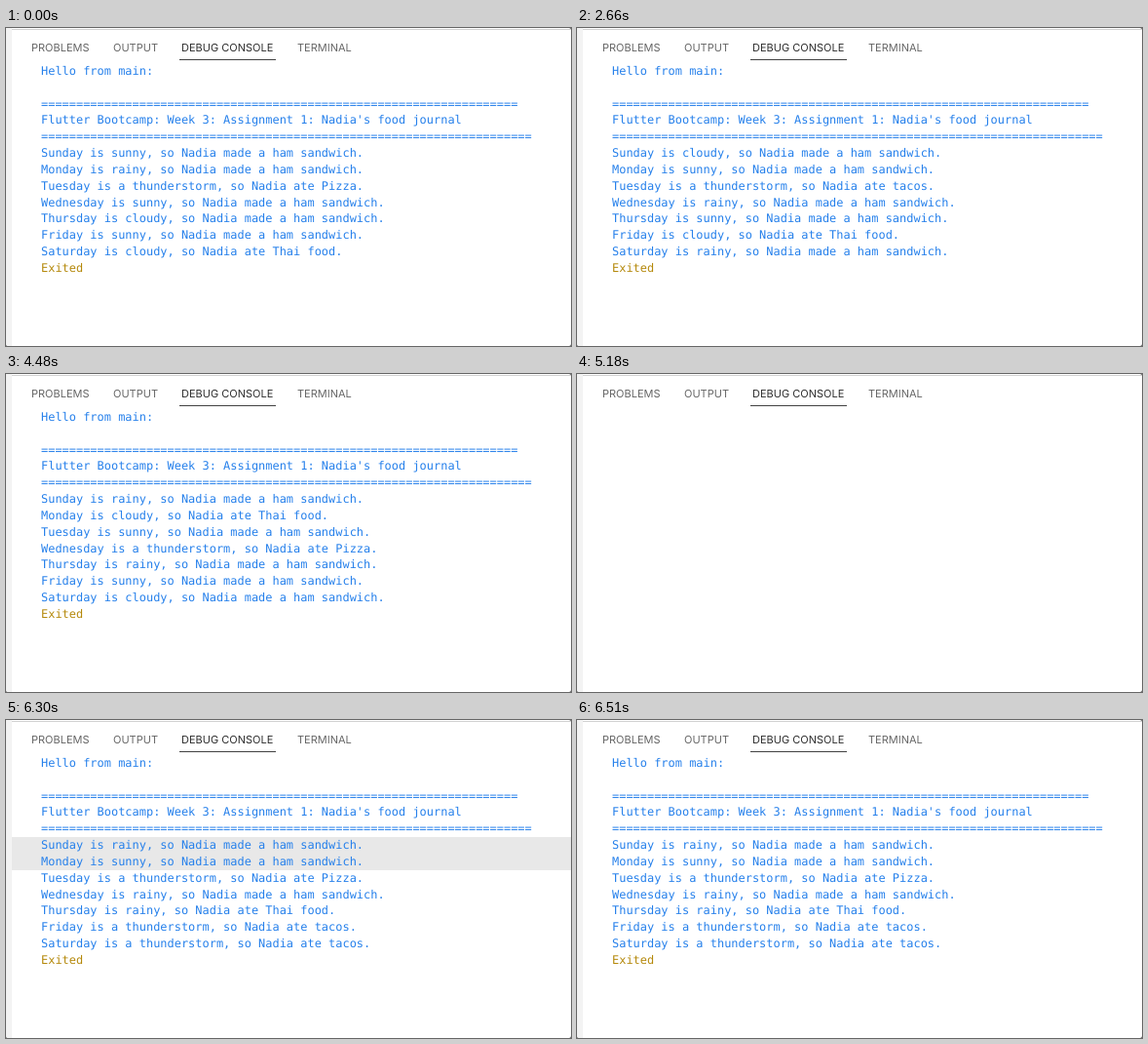
These frames come from a looping animation (580 by 326 pixels, 7.07 s). An HTML page:

```html
<!DOCTYPE html>
<html lang="en">
<head>
<meta charset="utf-8">
<title>Debug console</title>
<style>
  html, body { margin: 0; width: 100%; height: 100%; overflow: hidden; background: #444; }
  #stage {
    position: relative; width: 580px; height: 326px; overflow: hidden;
    background: #fff; border-radius: 0 2px 2px 2px;
    text-rendering: geometricPrecision;
  }
  #side { position: absolute; left: 0; top: 0; width: 6px; height: 326px; background: #f3f3f3; }
  #top { position: absolute; left: 6px; right: 0; top: 1px; height: 1px; background: #d2d2d2; }
  .tab {
    position: absolute; top: 13px; white-space: nowrap;
    font: 11px/14px Inter, "Open Sans", sans-serif; color: #666;
  }
  .active { color: #2f2f2f; }
  #line { position: absolute; left: 178px; top: 32px; width: 99px; height: 1px; background: #424242; }
  #log {
    position: absolute; left: 6px; right: 0; top: 36px;
    font: 11.96px/16.83px "DejaVu Sans Mono", monospace; color: #2680eb;
  }
  #log div { height: 16.83px; padding-left: 30px; white-space: pre; }
  #log div:last-child { color: #b5890c; }
  #log .hover { background: #e8e8e8; }
</style>
</head>
<body>
<div id="stage">
  <div id="side"></div>
  <div id="top"></div>
  <span class="tab" style="left:26px">PROBLEMS</span>
  <span class="tab" style="left:110px">OUTPUT</span>
  <span class="tab active" style="left:180px">DEBUG CONSOLE</span>
  <span class="tab" style="left:299px">TERMINAL</span>
  <div id="line"></div>
  <div id="log"></div>
</div>
<script>
const LOOP = 7070;
const log = document.getElementById("log");
const days = ["Sunday", "Monday", "Tuesday", "Wednesday", "Thursday", "Friday", "Saturday"];
const weather = { s: "sunny", r: "rainy", c: "cloudy", t: "a thunderstorm" };
const meals = { h: "made a ham sandwich", p: "ate Pizza", f: "ate Thai food", t: "ate tacos" };

// One run per entry: weather and meal codes for each day of the week
const runs = [
  "sh rh tp sh ch sh cf",
  "ch sh tt rh sh cf rh",
  "rh cf sh tp rh sh ch",
  "rh sh tp rh rf tt tt"
];

// start time, run (-1 is a cleared console), first and last hovered row
const steps = [
  [0, 0], [1820, -1], [2660, 1], [3850, -1], [4480, 2], [5180, -1], [5740, 3],
  [5950, 3, 0, 0], [6300, 3, 5, 6], [6370, 3, 7, 11], [6440, 3, 12, 12], [6510, 3]
];

function runLines(run) {
  if (run < 0) return [];
  const diary = runs[run].split(" ").map(([w, m], i) =>
    `${days[i]} is ${weather[w]}, so Nadia ${meals[m]}.`);
  return ["Hello from main:", "", "=".repeat(68),
    "Flutter Bootcamp: Week 3: Assignment 1: Nadia's food journal",
    "=".repeat(70), ...diary, "Exited"];
}

function show([, run, first, last]) {
  log.replaceChildren(...runLines(run).map((text, i) => {
    const row = document.createElement("div");
    row.textContent = text;
    if (i >= first && i <= last) row.className = "hover";
    return row;
  }));
}

let shown;
function frame(now) {
  const t = now % LOOP;
  const step = steps.findLast(s => s[0] <= t) || steps[0];
  if (step !== shown) show(shown = step);
  requestAnimationFrame(frame);
}
frame(performance.now());
</script>
</body>
</html>
```
